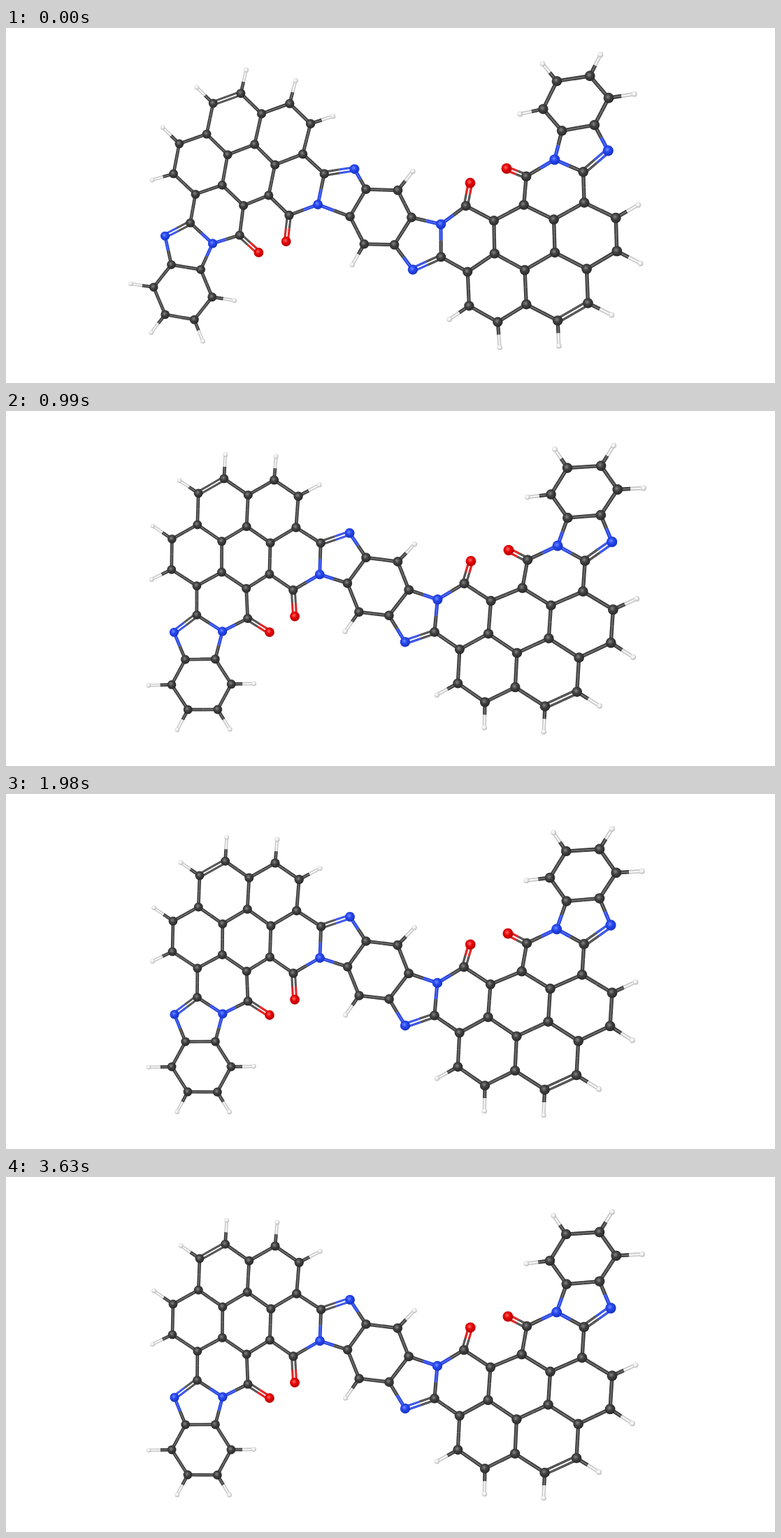
Recreate the animation shown at these times as an HTML page. Size 1100 px wide and 509 px high, loop 4.62 s.

```html
<!DOCTYPE html>
<html lang="en">
<head>
<meta charset="utf-8">
<title>Molecule settling</title>
<style>
  html, body { margin: 0; width: 100%; height: 100%; overflow: hidden; background: #fff; }
  svg { display: block; width: 100%; height: 100%; }
</style>
</head>
<body>
<svg viewBox="0 0 1100 509">
  <defs id="defs"></defs>
  <g id="mol"></g>
</svg>
<script>
const STEP = 330, LOOP = 4620;

// --- Flat molecule, bond length 1, grown ring by ring ---
const atoms = [], bonds = [];

function addAtom(x, y, side, kind = 'C') {
  const twin = atoms.findIndex(a => Math.hypot(a.x - x, a.y - y) < 0.3);
  if (twin >= 0) return twin;
  atoms.push({ x, y, side, kind, near: [] });
  return atoms.length - 1;
}

function link(i, j, double = false) {
  if (atoms[i].near.includes(j)) return;
  atoms[i].near.push(j);
  atoms[j].near.push(i);
  bonds.push({ i, j, double });
}

function setDouble(i, j) {
  bonds.find(b => (b.i === i && b.j === j) || (b.i === j && b.j === i)).double = true;
}

// Regular ring of n atoms, clockwise, starting with the edge from p to q
function ring(n, p, q, side) {
  const list = [p, q], turn = 2 * Math.PI / n;
  let { x, y } = atoms[q];
  let dir = Math.atan2(y - atoms[p].y, x - atoms[p].x);
  while (list.length < n) {
    dir += turn;
    x += Math.cos(dir);
    y += Math.sin(dir);
    list.push(addAtom(x, y, side));
  }
  list.forEach((a, k) => link(a, list[(k + 1) % n]));
  return list;
}

// One arm on a core edge; returns the atoms that anchor it on the stage
function arm(p, q, side) {
  const grow = (n, from, k) => ring(n, from[k + 1], from[k], side);
  const joint = ring(5, p, q, side);
  const imide = grow(6, joint, 2);
  const mid = grow(6, imide, 3);
  const inner = grow(6, imide, 4);
  const top = ring(6, mid[5], mid[4], side);
  const outer = grow(6, mid, 3);
  const lower = grow(6, mid, 2);
  const hinge = grow(5, lower, 3);
  const end = grow(6, hinge, 2);
  for (const a of [joint[2], joint[4], lower[3], hinge[4]]) atoms[a].kind = 'N';
  setDouble(joint[3], joint[4]);
  setDouble(hinge[0], hinge[4]);
  setDouble(top[3], top[4]);
  return [joint[0], joint[4], joint[2], imide[2], inner[4], top[3],
    outer[3], lower[2], hinge[4], end[2], end[4]];
}

// Carbons with a free side carry oxygen next to nitrogen, else hydrogen
function capEnds() {
  atoms.slice().forEach((a, i) => {
    if (a.kind !== 'C' || a.near.length !== 2) return;
    const [b, c] = a.near.map(n => atoms[n]);
    const kind = b.kind === 'N' || c.kind === 'N' ? 'O' : 'H';
    const ux = 2 * a.x - b.x - c.x, uy = 2 * a.y - b.y - c.y;
    const len = (kind === 'O' ? 0.87 : 0.77) / Math.hypot(ux, uy);
    a.cap = addAtom(a.x + ux * len, a.y + uy * len, a.side, kind);
    link(i, a.cap, kind === 'O');
  });
}

for (let k = 0; k < 6; k++) {
  const t = (k - 2) * Math.PI / 3;
  addAtom(Math.cos(t), Math.sin(t), 1);
}
for (let k = 0; k < 6; k++) link(k, (k + 1) % 6);
const armAnchors = [arm(0, 5, 0), arm(3, 2, 1)];
capEnds();
const anchors = armAnchors.flatMap(list => [...list, atoms[list[7]].cap]);

// Stage positions of the anchors, left arm then right arm
const spots = [
  [515, 211], [492, 176], [449, 235], [411, 257], [385, 99], [277, 117],
  [238, 226], [346, 297], [241, 316], [322, 391], [260, 427], [377, 317],
  [548, 294], [571, 332], [617, 271], [655, 248], [685, 418], [816, 403],
  [867, 285], [745, 214], [865, 188], [778, 120], [849, 79], [718, 200]];

// --- Smooth map from the flat molecule to the stage (thin plate spline) ---
function solve(m) {
  const n = m.length;
  for (let c = 0; c < n; c++) {
    let p = c;
    for (let r = c + 1; r < n; r++) if (Math.abs(m[r][c]) > Math.abs(m[p][c])) p = r;
    [m[c], m[p]] = [m[p], m[c]];
    for (let r = 0; r < n; r++) {
      if (r === c) continue;
      const f = m[r][c] / m[c][c];
      if (f) for (let k = c; k <= n; k++) m[r][k] -= f * m[c][k];
    }
  }
  return m.map((row, i) => row[n] / row[i]);
}

function basis({ x, y }) {
  const row = anchors.map(a => {
    const d = Math.hypot(x - atoms[a].x, y - atoms[a].y);
    return d ? d * d * Math.log(d) : 0;
  });
  return [...row, 1, x, y];
}

function field(axis) {
  const rows = anchors.map((a, i) => [...basis(atoms[a]), spots[i][axis]]);
  for (let k = 0; k < 3; k++) {
    rows.push([...anchors.map(a => [1, atoms[a].x, atoms[a].y][k]), 0, 0, 0, 0]);
  }
  const w = solve(rows);
  return a => basis(a).reduce((s, v, i) => s + v * w[i], 0);
}

const mapX = field(0), mapY = field(1);
const rest = atoms.map(a => [mapX(a), mapY(a)]);

// --- Motion: both arms swing about their middles while the whole stretches ---
const pivots = [{ x: 340, y: 227, angle: 0.168 }, { x: 732, y: 222, angle: -0.093 }];
const swing = [1, 0.6, -0.15, -0.04, 0];
const stretch = [0, 0.5, 1, 0.6, 0];

function pose(step) {
  return rest.map(([x, y], i) => {
    const c = pivots[atoms[i].side], t = c.angle * swing[step];
    const dx = x - c.x, dy = y - c.y, s = stretch[step];
    return [
      c.x + dx * Math.cos(t) - dy * Math.sin(t) + (x - 510) * 0.0075 * s,
      c.y + dx * Math.sin(t) + dy * Math.cos(t) - (x - 510) * 0.004 * s];
  });
}

// --- Drawing ---
const paint = {
  C: { edge: '#383838', mid: '#6c6c6c', ball: ['#868686', '#414141', '#282828'], r: 7 },
  N: { edge: '#2440dc', mid: '#4f68f4', ball: ['#7389ff', '#2446ee', '#1834c0'], r: 7.2 },
  O: { edge: '#d40808', mid: '#f03a3a', ball: ['#ff6a6a', '#e60505', '#b40000'], r: 7.3 },
  H: { edge: '#c6c6c6', mid: '#f8f8f8', ball: ['#ffffff', '#eeeeee', '#b8b8b8'], r: 3.7 }
};

document.getElementById('defs').innerHTML = Object.entries(paint).map(([k, { ball }]) =>
  `<radialGradient id="ball${k}" cx=".42" cy=".4" r=".6">` +
  ball.map((c, i) => `<stop offset="${[0, 0.45, 1][i]}" stop-color="${c}"/>`).join('') +
  '</radialGradient>').join('');

const depth = x => 0.9 + (x - 200) / 700 * 0.17;
const fix = v => v.toFixed(2);

function line(a, b, off, width, colour) {
  const len = Math.hypot(b[0] - a[0], b[1] - a[1]) || 1;
  const ox = -(b[1] - a[1]) / len * off, oy = (b[0] - a[0]) / len * off;
  return `<line x1="${fix(a[0] + ox)}" y1="${fix(a[1] + oy)}" x2="${fix(b[0] + ox)}" y2="${fix(b[1] + oy)}"` +
    ` stroke="${colour}" stroke-width="${fix(width)}"/>`;
}

function halfStick(a, b, kind, double) {
  const { edge, mid } = paint[kind], s = depth(a[0]);
  const offsets = double ? [-2.6, 2.6] : [0], w = (double ? 3.1 : 5.1) * s;
  return offsets.map(o => line(a, b, o * s, w, edge) + line(a, b, o * s, w * 0.4, mid)).join('');
}

function stick(a, b, ka, kb, double) {
  const m = [(a[0] + b[0]) / 2, (a[1] + b[1]) / 2];
  return halfStick(a, m, ka, double) + halfStick(b, m, kb, double);
}

function ball([x, y], kind) {
  return `<circle cx="${fix(x)}" cy="${fix(y)}" r="${fix(paint[kind].r * depth(x))}" fill="url(#ball${kind})"/>`;
}

function draw(points) {
  const sticks = bonds.map(({ i, j, double }) =>
    stick(points[i], points[j], atoms[i].kind, atoms[j].kind, double));
  const balls = points.map((p, i) => ball(p, atoms[i].kind));
  return sticks.join('') + balls.join('');
}

const views = swing.map((_, step) => draw(pose(step)));
const mol = document.getElementById('mol');
let shown = -1;

function render(t) {
  const step = Math.min(Math.floor((t % LOOP) / STEP), views.length - 1);
  if (step !== shown) mol.innerHTML = views[shown = step];
}

function tick() {
  render(performance.now());
  requestAnimationFrame(tick);
}
tick();
</script>
</body>
</html>
```
